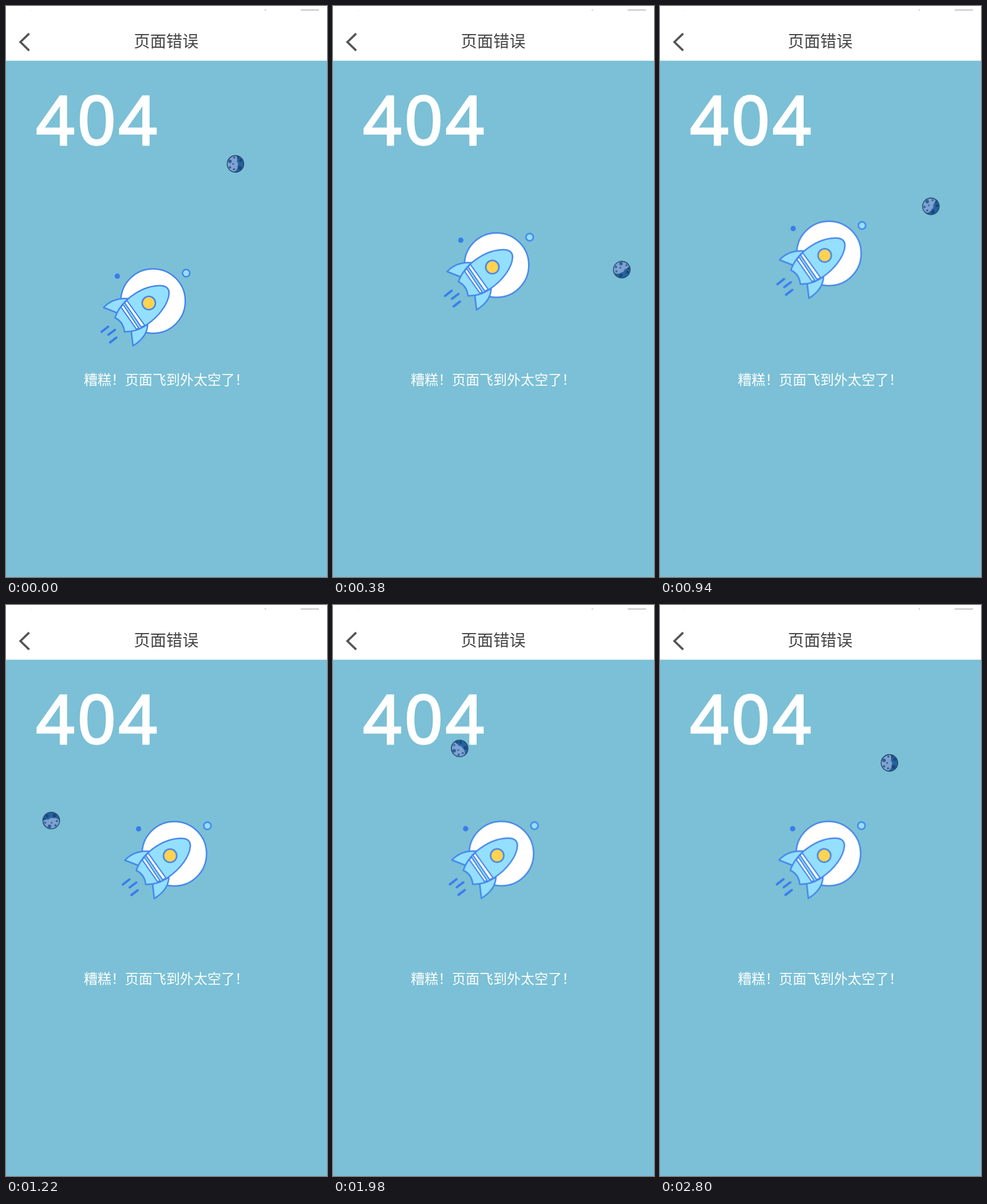
Recreate the animation shown at these times as an HTML page. Size 561 px wide and 998 px high, loop 2820 ms.

```html
<!DOCTYPE html>
<html lang="zh-CN">
<head>
<meta charset="utf-8">
<title>页面错误</title>
<style>
  html, body { margin: 0; width: 100%; height: 100%; overflow: hidden; background: #7bc0d6; }
  svg { display: block; width: 561px; height: 998px; }
  text { font-family: "Noto Sans CJK SC", "Noto Sans CJK", sans-serif; }
  .code { font: 117px "Open Sans", "Noto Sans", sans-serif; letter-spacing: 5.3px; fill: #fff; stroke: #fff; stroke-width: 3.6px; }
  .line { stroke: #4384ec; stroke-width: 2.5px; stroke-linejoin: round; }
  .sky { fill: #94dffe; }
  .band { fill: #fff; stroke-width: 2.2px; }
  .flame { stroke: #3a7aee; stroke-width: 4px; stroke-linecap: round; fill: none; }
  #moon { transform-origin: 283px 463.7px; }
</style>
</head>
<body>
<svg viewBox="0 0 561 998">
  <rect width="561" height="998" fill="#7bc0d6"/>
  <rect width="561" height="95.6" fill="#fff"/>
  <rect x="515" y="6" width="32" height="2" fill="#c4c4c4"/>
  <rect x="452" y="6" width="2.5" height="1.5" fill="#bbb"/>
  <rect x="42" y="7" width="3" height="1" fill="#eee"/>
  <path d="M40.5 48.2L25.2 63L40.5 77.8" fill="none" stroke="#555" stroke-width="3.8"/>
  <text x="280" y="72" font-size="28.3" text-anchor="middle" fill="#444">页面错误</text>
  <text class="code" x="52.7" y="241.5">404</text>
  <text x="136" y="662.3" font-size="24" fill="#fff">糟糕！页面飞到外太空了！</text>

  <g id="rocket">
    <circle class="line" cx="257" cy="515.8" r="56.3" fill="#fff"/>
    <circle cx="194.5" cy="472.2" r="4.6" fill="#3a7aee"/>
    <circle class="line sky" cx="314.8" cy="466.8" r="6.4"/>
    <path class="line sky" d="M170.5 527C181 516 196 510 214 511.5L196 537Z"/>
    <path class="line sky" d="M219 568.5L222 594C238 584 247 572 247.5 557Z"/>
    <path class="line sky" d="M213 512C228 499.5 248 489 268 488.7C279.5 488.5 285 493 285 502C284 520 268 542 246 557Q234 566 219 568.5L207 569.5C206 559 201 550 190.5 545Q193 537 197 531Q204 520 213 512Z"/>
    <path class="line band" d="M211 514.4L242.6 558.4L236.4 561.1L207.4 518.7Z"/>
    <path class="line band" d="M204.7 521.9L232 563L228 564.8L201 526.3Z"/>
    <circle class="line" cx="249.6" cy="519.2" r="11.6" fill="#ffd34f"/>
    <path class="flame" d="M167 569.5L178.5 560.5M179 574.5L190.5 566M182 587.8L193 579.5"/>
  </g>

  <g id="moon">
    <circle cx="401" cy="276" r="14.6" fill="#24639f"/>
    <path fill="#7fa2d0" d="M402 262C407 266 402 269 404 273C408 276 403 280 405 283C402 286 403 289 398 289.8A14 14 0 0 1 388 271Q393 262 402 262Z"/>
    <g fill="#2a5d98">
      <circle cx="391.5" cy="271.5" r="3"/>
      <circle cx="397" cy="276" r="1.5"/>
      <circle cx="391.5" cy="282" r="2"/>
      <circle cx="398.5" cy="285.5" r="1.8"/>
      <circle cx="399" cy="265" r="1.8"/>
    </g>
    <g fill="#1d4c83" stroke="#153a68">
      <circle cx="408.5" cy="283" r="2.6"/>
      <circle cx="410" cy="270" r="2"/>
      <circle cx="405.5" cy="265.5" r="1.2"/>
    </g>
    <circle cx="401" cy="276" r="14.6" fill="none" stroke="#1c3556" stroke-width="1.1"/>
  </g>
</svg>
<script>
  const LOOP = 2820, STEP = 20, ORBIT = 2400;
  const DECAY = 0.0039, OMEGA = 2 * Math.PI / 380;
  const FLIGHT = { x: 37.3, y: -81.3 };

  // Damped spring released at rest: 0 at the start, settling on 1
  const spring = t => 1 - Math.exp(-DECAY * t) *
    (Math.cos(OMEGA * t) + DECAY / OMEGA * Math.sin(OMEGA * t));

  const flight = Array.from({ length: LOOP / STEP + 1 }, (_, i) => {
    const p = spring(i * STEP);
    return { transform: `translate(${FLIGHT.x * p}px, ${FLIGHT.y * p}px)` };
  });

  const orbit = [
    { transform: 'rotate(0deg)', offset: 0, easing: 'cubic-bezier(.423, 0, .491, 1)' },
    { transform: 'rotate(1080deg)', offset: ORBIT / LOOP },
    { transform: 'rotate(1080deg)', offset: 1 }
  ];

  const play = (id, frames) => {
    const anim = document.getElementById(id).animate(frames, { duration: LOOP, fill: 'both' });
    anim.pause();
    return anim;
  };
  const anims = [play('rocket', flight), play('moon', orbit)];

  const start = performance.now();
  function tick() {
    const t = (performance.now() - start) % LOOP;
    const time = Math.floor(t / STEP) * STEP;
    for (const anim of anims) anim.currentTime = time;
    requestAnimationFrame(tick);
  }
  tick();
</script>
</body>
</html>
```
